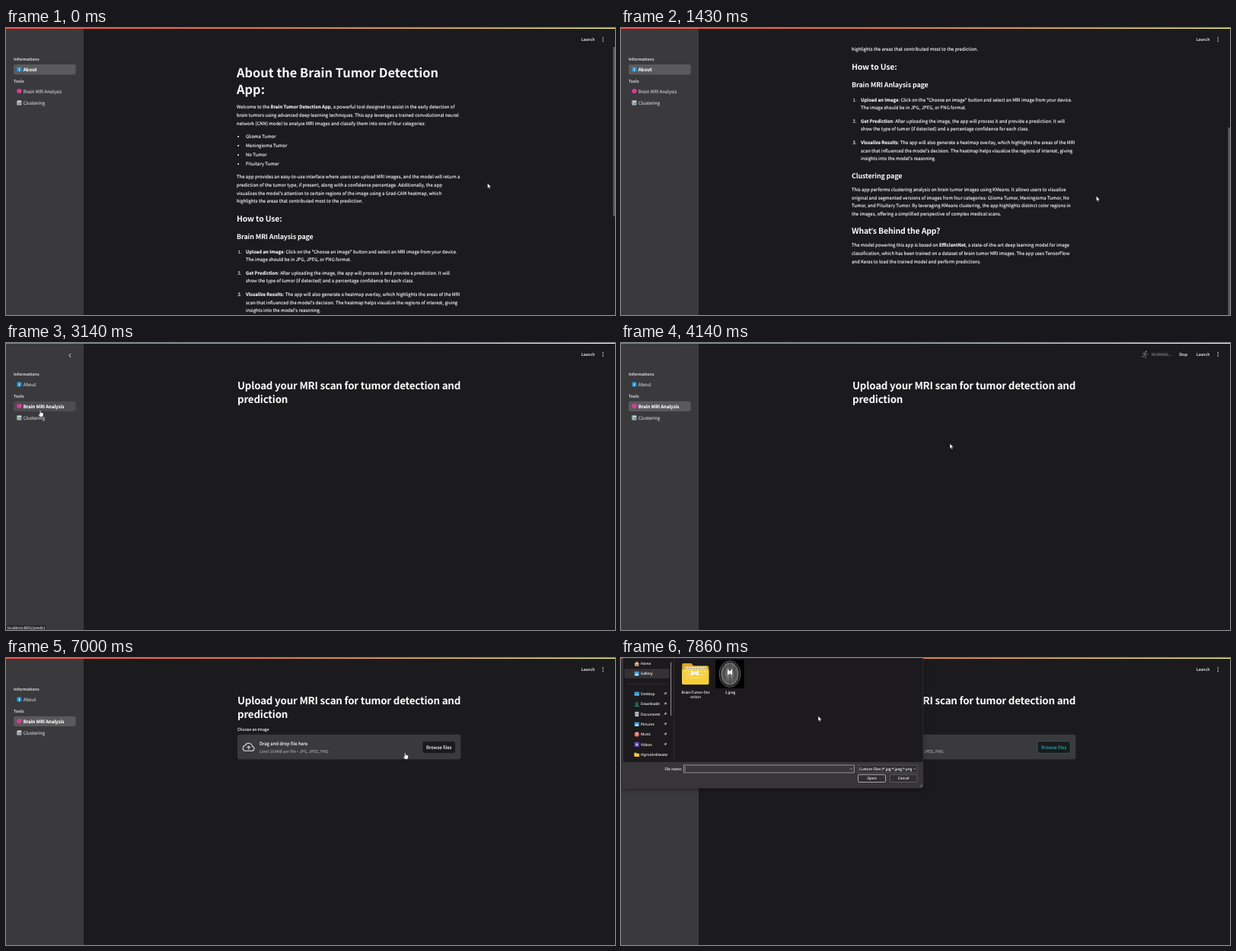
Animation, 800 px wide and 378 px high, one loop 8 s. Source, as an HTML page:

```html
<!DOCTYPE html>
<html lang="en">
<head>
<meta charset="utf-8">
<title>Brain Tumor Detection App</title>
<style>
html, body { margin: 0; width: 100%; height: 100%; overflow: hidden; background: #1b1a1c; }
svg { display: block; width: 100vw; height: 100vh; }
text { font-family: "Noto Sans CJK KR", "Noto Sans CJK JP", "Noto Sans CJK", "Noto Sans", sans-serif;
  color: #fafafa; fill: currentColor; stroke: currentColor; stroke-width: .12px;
  text-rendering: geometricPrecision; white-space: pre; }
.alt { font-family: "Open Sans", sans-serif; }
#dialog text { font-family: "Open Sans", "Noto Sans", sans-serif; font-size: 4.75px; color: #f2f2f2; }
#dialog { filter: drop-shadow(0 2px 3px rgba(0, 0, 0, .4)); }
.line { fill: none; stroke-linecap: round; stroke-linejoin: round; }
</style>
</head>
<body>
<svg viewBox="0 0 800 378" preserveAspectRatio="none">
  <defs>
    <linearGradient id="rainbow">
      <stop offset="0" stop-color="#ff4b4b"/><stop offset=".45" stop-color="#f58a50"/>
      <stop offset="1" stop-color="#fffd80"/>
    </linearGradient>
    <radialGradient id="scan">
      <stop offset="0" stop-color="#8a8a8a"/><stop offset=".75" stop-color="#555"/><stop offset="1" stop-color="#777"/>
    </radialGradient>
    <clipPath id="filter"><rect x="312" y="141" width="70" height="10"/></clipPath>
  </defs>
  <rect width="800" height="378" fill="#1b1a1c"/>

  <g id="about">
    <g id="article"></g>
    <rect id="thumb" x="797.4" y="1" width="2.6" height="247" rx="1" fill="#5b5a5d"/>
    <rect x="102" width="698" height="25" fill="#1b1a1c"/>
  </g>

  <g id="predict">
    <g id="heading"></g>
    <g id="uploader">
      <rect x="304" y="100.8" width="293.4" height="32.8" rx="3" fill="#3a393b"/>
      <g class="line" stroke="#c4c4c6" stroke-width="1.3">
        <path d="M314.6 122.4h8.4a3.1 3.1 0 0 0 .6-6.1a5 5 0 0 0-9.4-1.2a3.7 3.7 0 0 0 .4 7.3z"/>
        <path d="M318.8 120v-3.8m-1.7 1.6l1.7-1.7l1.7 1.7"/>
      </g>
      <rect id="browseBox" x="547" y="109.6" width="43.4" height="16" rx="3" fill="#1b1a1c" stroke-width=".5"/>
    </g>
  </g>

  <g id="sidebar">
    <rect width="102" height="378" fill="#3a393b"/>
    <rect id="pillAbout" x="10" y="48" width="81.7" height="13.4" rx="3"/>
    <rect id="pillBrain" x="10" y="76.7" width="81.7" height="13.4" rx="3"/>
    <rect x="14.4" y="51.6" width="6" height="6" rx=".8" fill="#2196d9"/>
    <path class="line" d="M17.4 54.3v1.9m0-3.2v.1" stroke="#fff" stroke-width=".9"/>
    <path d="M14.2 83.2c0-2 1.6-3.2 3.3-2.9c2-.3 3.4 1.2 3.2 2.8c0 1.4-.9 1.8-1.5 2.1l-.4 1.2l-1.4-.8c-1.8.4-3.2-.6-3.2-2.4z" fill="#e53da0"/>
    <path class="line" d="M16 82.6q1.2-1 1.9.2t1.5-.3" stroke="#a82479" stroke-width=".4"/>
    <rect x="14.4" y="95.4" width="6" height="6" rx=".6" fill="#d5dde2"/>
    <path d="M15.2 96.5h1.2v4.3h-1.2z" fill="#4caf6d"/>
    <path d="M16.9 98.4h1.2v2.4h-1.2z" fill="#d9534f"/>
    <path d="M18.5 97.2h1.2v3.6h-1.2z" fill="#2878c8"/>
    <path id="collapse" class="line" d="M85 14.3l-2.1 2.2l2.1 2.2" stroke="#fafafa" stroke-width=".9"/>
  </g>

  <g id="status">
    <rect y="371" width="53.5" height="7" fill="#2b2a2c" stroke="#4b4a4d" stroke-width=".4"/>
  </g>
  <rect width="800" height="1" fill="url(#rainbow)"/>
  <g id="toolbar">
    <g fill="#fafafa"><circle cx="784.2" cy="12.8" r=".7"/><circle cx="784.2" cy="15.1" r=".7"/><circle cx="784.2" cy="17.4" r=".7"/></g>
    <g id="running">
      <circle cx="689.6" cy="11.3" r="1" fill="#858487"/>
      <path id="runner" class="line" stroke="#858487" stroke-width=".9"/>
    </g>
  </g>

  <g id="dialog">
    <path d="M2.5 0H397V168.5q0 2.8-2.8 2.8H5.3q-2.8 0-2.8-2.8z" fill="#1c1a1c" stroke="#59575a" stroke-width=".4"/>
    <path d="M2.7 137H396.8V168.3q0 2.8-2.8 2.8H5.5q-2.8 0-2.8-2.8z" fill="#373537"/>
    <rect x="4.5" y="14.2" width="59" height="12.6" rx="1.2" fill="#343235"/>
    <path d="M8 34.2H60M69.3 0V137" stroke="#3d3b3e" stroke-width=".6"/>
    <path d="M65.6 6V75.5" class="line" stroke="#99979a" stroke-width="1"/>

    <path d="M17.4 7.8l3.4-3.3l3.4 3.3h-.9v2.9h-5v-2.9z" fill="#e8b48a"/><path d="M20 8.2h1.7v2.5H20z" fill="#bd5c35"/>
    <rect x="17.6" y="17.8" width="6.2" height="5.6" rx=".9" fill="#2fa3e8"/><path d="M18 23l2.6-3l2.8 3z" fill="#e8f6ff"/>
    <rect x="17.6" y="44.4" width="6.4" height="5" rx=".6" fill="#2d9bdc"/><path d="M17.6 48h6.4v1.2h-6.4z" fill="#75d0f2"/>
    <path class="line" d="M20.8 57.6v4.2m-2-1.8l2 2l2-2M18 63.4h5.6" stroke="#2cc08b" stroke-width=".9"/>
    <rect x="18.4" y="70.7" width="4.9" height="6.4" rx=".6" fill="#b9c3cc"/><path d="M19.3 73h3.1m-3.1 1.5h3.1" stroke="#63717d" stroke-width=".5"/>
    <rect x="17.6" y="84.4" width="6.4" height="5.4" rx=".7" fill="#2c9ce2"/><path d="M18 89.5l2.6-3.1l3 3.1z" fill="#dff2ff"/>
    <circle cx="20.8" cy="100.4" r="3.2" fill="#d9695c"/><path class="line" d="M20.4 102v-3.4l1.5.6" stroke="#fff" stroke-width=".7"/>
    <rect x="17.7" y="110.8" width="6.2" height="6.2" rx=".8" fill="#6747d8"/><path d="M19.9 112.4l2.5 1.5l-2.5 1.5z" fill="#fff"/>
    <path d="M17.4 124.8h2.5l.8.9h3.4v4.3h-6.7z" fill="#f5c83a"/>

    <path d="M80.2 9q0-2 2-2h10l3 3.2h18q2 0 2 2v4H80.2z" fill="#e0a526"/>
    <rect x="84" y="11.5" width="28" height="14" fill="#e7e7df"/>
    <path d="M84 13.5h28" stroke="#8f9a8f" stroke-width="1" stroke-dasharray="2.4 1.2"/>
    <path d="M80 16.5q0-2 2-2h31.5q2 0 2 2V33q0 2-2 2H82q-2 0-2-2z" fill="#f7cf35"/>
    <path d="M84 18h28m-27 4h26m-24 4h22" stroke="#f6ecd0" stroke-width="1.3" stroke-dasharray="2 2.2"/>
    <path d="M92 15.5l5 3.5l5-3.5v8l-5-2.5l-5 2.5z" fill="#eef2f2"/>

    <rect x="124.2" y="2.2" width="37.5" height="37.8" fill="#000"/>
    <ellipse cx="143" cy="21" rx="13.8" ry="17.3" fill="#1b1b1b" stroke="#777" stroke-width=".8"/>
    <ellipse cx="143" cy="21" rx="11.6" ry="15" fill="url(#scan)"/>
    <path d="M143 6.5v29M135 11q3 3 1 7t1 9m13-16q-3 3-1 7t-1 9" class="line" stroke="#3c3c3c" stroke-width="1"/>
    <path d="M140 14.5l3 3l3-3v8l-3-2l-3 2z" fill="#f1f1f1"/>

    <rect x="82.3" y="141" width="224" height="10" fill="#39373a" stroke="#b9b8ba" stroke-width=".7"/>
    <path d="M84.3 142.8v6.4" stroke="#ddd" stroke-width=".5"/>
    <rect x="311.3" y="141" width="78" height="10" fill="#302e31" stroke="#737174" stroke-width=".5"/>
    <path class="line" d="M300.8 145.5l1.5 1.4l1.5-1.4M384.3 145.5l1.5 1.4l1.5-1.4" stroke="#ccc" stroke-width=".6"/>
    <rect x="311.5" y="153.7" width="36" height="9.8" rx="1.3" fill="#302e31" stroke="#d5d4d6" stroke-width=".7"/>
    <rect x="353.3" y="153.7" width="35.8" height="9.8" rx="1.3" fill="#302e31" stroke="#858386" stroke-width=".5"/>
    <path d="M392.2 170l3.6-3.6m-1.5 3.6l1.5-1.5" stroke="#aaa" stroke-width=".6"/>
  </g>

  <g id="cursor" stroke="#111" stroke-width=".4" stroke-linejoin="round">
    <path id="arrow" d="M0 0V6.6l1.5-1.4l1 2.4l1.1-.5l-1-2.3h2.1z" fill="#fff"/>
    <path id="hand" d="M-.7.6q.7-1.1 1.4 0v2.5q.7-.5 1.2.1q.7-.4 1.1.2q1-.2 1 .8v2l-.8 2.4h-3.6l-2-3q-.2-1 .7-.8l1 .8z" fill="#fff"/>
  </g>
</svg>

<script>
const $ = id => document.getElementById(id);
const BODY = 5.97, SMALL = 5.22, H1 = 16.42, H2 = 13.36, H3 = 10.45, H4 = 8.95;

function add(parent, tag, attrs) {
  const node = document.createElementNS("http://www.w3.org/2000/svg", tag);
  for (const key in attrs) node.setAttribute(key, attrs[key]);
  parent.append(node);
  return node;
}

// Adds one line of text; **double stars** mark bold runs.
function write(parent, x, y, string, size = BODY, attrs = {}) {
  const text = add($(parent), "text", { x, y, "font-size": size, ...attrs });
  string.split("**").forEach((run, i) => {
    run.split(/([’•])/).filter(Boolean).forEach(piece => {
      const span = add(text, "tspan", i % 2 ? { "font-weight": 700 } : {});
      span.textContent = piece;
      if (/^[’•]$/.test(piece)) span.setAttribute("class", "alt");
    });
  });
  return text;
}

function lines(parent, x, y, list, step = 10.67, size, attrs) {
  list.forEach((s, i) => write(parent, x, y + i * step, s, size, attrs));
}

const strong = { "font-weight": 700, style: "stroke:none" };
const semi = { "font-weight": 600, "letter-spacing": "-.015em", style: "stroke:none" };

lines("article", 303, 65.3, ["About the Brain Tumor Detection", "App:"], 22, H1, strong);
lines("article", 303, 106.3, [
  "Welcome to the **Brain Tumor Detection App**, a powerful tool designed to assist in the early detection of",
  "brain tumors using advanced deep learning techniques. This app leverages a trained convolutional neural",
  "network (CNN) model to analyze MRI images and classify them into one of four categories:"]);
["Glioma Tumor", "Meningioma Tumor", "No Tumor", "Pituitary Tumor"].forEach((name, i) => {
  const y = 144.9 + i * 12.08;
  write("article", 315, y, name);
  add($("article"), "circle", { cx: 305.1, cy: y - 1.9, r: 1, fill: "#fafafa" });
});
lines("article", 303, 198.4, [
  "The app provides an easy-to-use interface where users can upload MRI images, and the model will return a",
  "prediction of the tumor type, if present, along with a confidence percentage. Additionally, the app",
  "visualizes the model's attention to certain regions of the image using a Grad-CAM heatmap, which",
  "highlights the areas that contributed most to the prediction."]);
write("article", 303, 254.5, "How to Use:", H3, semi);
write("article", 303, 278.2, "Brain MRI Anlaysis page", H4, semi);
[296.7, 324.7, 352.9].forEach((y, i) => write("article", 304.6, y, i + 1 + "."));
lines("article", 315, 296.7, [
  "**Upload an Image**: Click on the \"Choose an image\" button and select an MRI image from your device.",
  "The image should be in JPG, JPEG, or PNG format."]);
lines("article", 315, 324.7, [
  "**Get Prediction**: After uploading the image, the app will process it and provide a prediction. It will",
  "show the type of tumor (if detected) and a percentage confidence for each class."]);
lines("article", 315, 352.9, [
  "**Visualize Results**: The app will also generate a heatmap overlay, which highlights the areas of the MRI",
  "scan that influenced the model's decision. The heatmap helps visualize the regions of interest, giving",
  "insights into the model's reasoning."]);
write("article", 303, 398, "Clustering page", H4, semi);
lines("article", 303, 414.9, [
  "This app performs clustering analysis on brain tumor images using KMeans. It allows users to visualize",
  "original and segmented versions of images from four categories: Glioma Tumor, Meningioma Tumor, No",
  "Tumor, and Pituitary Tumor. By leveraging KMeans clustering, the app highlights distinct color regions in",
  "the images, offering a simplified perspective of complex medical scans."]);
write("article", 303, 471.2, "What’s Behind the App?", H3, semi);
lines("article", 303, 488.2, [
  "The model powering this app is based on **EfficientNet**, a state-of-the-art deep learning model for image",
  "classification, which has been trained on a dataset of brain tumor MRI images. The app uses TensorFlow",
  "and Keras to load the trained model and perform predictions."]);

lines("heading", 304, 60.9, ["Upload your MRI scan for tumor detection and", "prediction"], 18, H2, semi);
write("uploader", 304, 96.2, "Choose an image", SMALL);
write("uploader", 333, 115.1, "Drag and drop file here");
write("uploader", 333, 125.4, "Limit 200MB per file • JPG, JPEG, PNG", SMALL, { style: "color:#a3a2a5" });

const middle = { "text-anchor": "middle" };
const browse = write("uploader", 568.7, 119.7, "Browse files", BODY, middle);

const grey = { style: "color:#c9c8ca", "font-weight": 600 };
write("sidebar", 10, 43.1, "Informations", SMALL, grey);
write("sidebar", 10, 71.9, "Tools", SMALL, grey);
const aboutItem = write("sidebar", 22.8, 57, "About");
const brainItem = write("sidebar", 22.8, 85.9, "Brain MRI Analysis");
write("sidebar", 22.8, 100.9, "Clustering", BODY, { style: "color:#c9c8ca" });
write("status", 2, 376.5, "localhost:8501/predict", 4.7, { style: "color:#d5d4d6" });
write("toolbar", 755.4, 17.2, "Launch", SMALL, { "font-weight": 500 });
write("running", 697, 17.1, "RUNNING...", 4.9, { style: "color:#858487" });
write("running", 733, 17.2, "Stop", SMALL, { "font-weight": 500 });

const places = { Home: 9.2, Gallery: 22.3, Desktop: 48.8, Downloads: 62.2, Documents: 75.6,
  Pictures: 88.9, Music: 102.2, Videos: 115.6, "thyroid+disease": 128.9 };
Object.entries(places).forEach(([name, y], i) => {
  write("dialog", 26, y, name);
  if (i < 2 || i > 7) return;
  add($("dialog"), "path", {
    d: `M56.2 ${y}l1.5-1.5m-.9-1.1l2 2l.3-1.2l1-.9l-1.2-1.2l-.9 1z`,
    fill: "#a9a8aa", stroke: "#a9a8aa", "stroke-width": .4 });
});
write("dialog", 98, 46.5, "Brain-Tumor-Det", BODY, middle);
write("dialog", 98, 52.7, "ection", BODY, middle);
write("dialog", 143.5, 46.5, "2.jpeg", BODY, middle);
write("dialog", 57.5, 147.8, "File name:");
write("dialog", 313, 147.8, "Custom Files (*.jpg;*.jpeg;*.png", BODY, { "clip-path": "url(#filter)" });
write("dialog", 329.5, 160.2, "Open", BODY, middle);
write("dialog", 371.2, 160.2, "Cancel", BODY, middle);

// Tracks are rows of [time, ...values], joined by straight lines.
const scrollTrack = [[140, 0], [1000, 200], [1430, 200], [1860, 0]];
const cursorTrack = [[0, 632.5, 204.5], [1290, 626.5, 223], [1714, 620, 218], [2286, 35.5, 66.7],
  [2571, 43, 82], [3000, 45, 88.7], [3286, 45, 88.7], [4000, 432, 132.5], [6000, 432, 132.5],
  [6429, 480, 174], [6571, 480, 174], [7000, 524.2, 124.7], [7286, 566, 119],
  [7571, 560, 117], [7857, 259, 76.5]];
const strides = ["M688.8 13.2l-1.5 3l2 1.3l-.3 2.3M687.3 16.2l-.9 1.7h-2M685.3 14.7l1.2-1.6l2.3.1l1 1.7l1.7.2",
  "M688.8 13.2l-1.2 3.1l1.3 1.6l-1.5 2M687.6 16.3l1.9.8l.8 2M686.2 15.5l.6-1.8l2-.5l.4 2l1.6.7"];

function sample(track, t) {
  const next = track.findIndex(row => row[0] > t);
  if (next === 0) return track[0].slice(1);
  if (next < 0) return track[track.length - 1].slice(1);
  const a = track[next - 1], b = track[next], k = (t - a[0]) / (b[0] - a[0]);
  return a.slice(1).map((v, i) => v + (b[i + 1] - v) * k);
}

const show = (id, on) => $(id).style.display = on ? "" : "none";
const within = (t, from, to) => t >= from && t < to;

function mark(item, active) {
  item.style.fontWeight = active ? 700 : 400;
  item.style.color = active ? "#fafafa" : "#c9c8ca";
}

function draw(now) {
  const tick = Math.floor((now % 8000) * 7 / 1000 + .05);   // seven pictures a second
  const t = tick * 1000 / 7 + 1;
  const [scroll] = sample(scrollTrack, t);
  const [x, y] = sample(cursorTrack, t);
  const onAbout = t < 3000;
  const overSidebar = x < 102;
  const overBrain = within(t, 2000, 4000) && x < 92 && y > 76;
  const hand = overBrain || within(t, 6850, 7570);
  const hot = t > 7140;

  show("about", onAbout);
  show("thumb", !overSidebar);
  show("predict", !onAbout);
  show("uploader", t > 6000);
  show("running", within(t, 3571, 6000));
  show("collapse", overSidebar);
  show("status", overBrain);
  show("dialog", t > 7571);
  show("arrow", !hand);
  show("hand", hand);

  $("article").setAttribute("transform", `translate(0 ${-scroll})`);
  $("thumb").setAttribute("y", 1 + scroll * .65);
  $("cursor").setAttribute("transform", `translate(${x} ${y})`);
  $("runner").setAttribute("d", strides[within(t, 5290, 5710) ? 0 : (tick + 1) % 2]);
  $("pillAbout").setAttribute("fill", onAbout ? "#5a595b" : "none");
  $("pillBrain").setAttribute("fill", overBrain ? "#4d4c4e" : onAbout ? "none" : "#5a595b");
  mark(aboutItem, onAbout);
  mark(brainItem, !onAbout);
  browse.style.color = hot ? "#1fa9a9" : "#fafafa";
  $("browseBox").setAttribute("stroke", hot ? "#2b9192" : "#49484b");
}

const start = performance.now();
(function loop() {
  draw(performance.now() - start);
  requestAnimationFrame(loop);
})();
</script>
</body>
</html>
```
